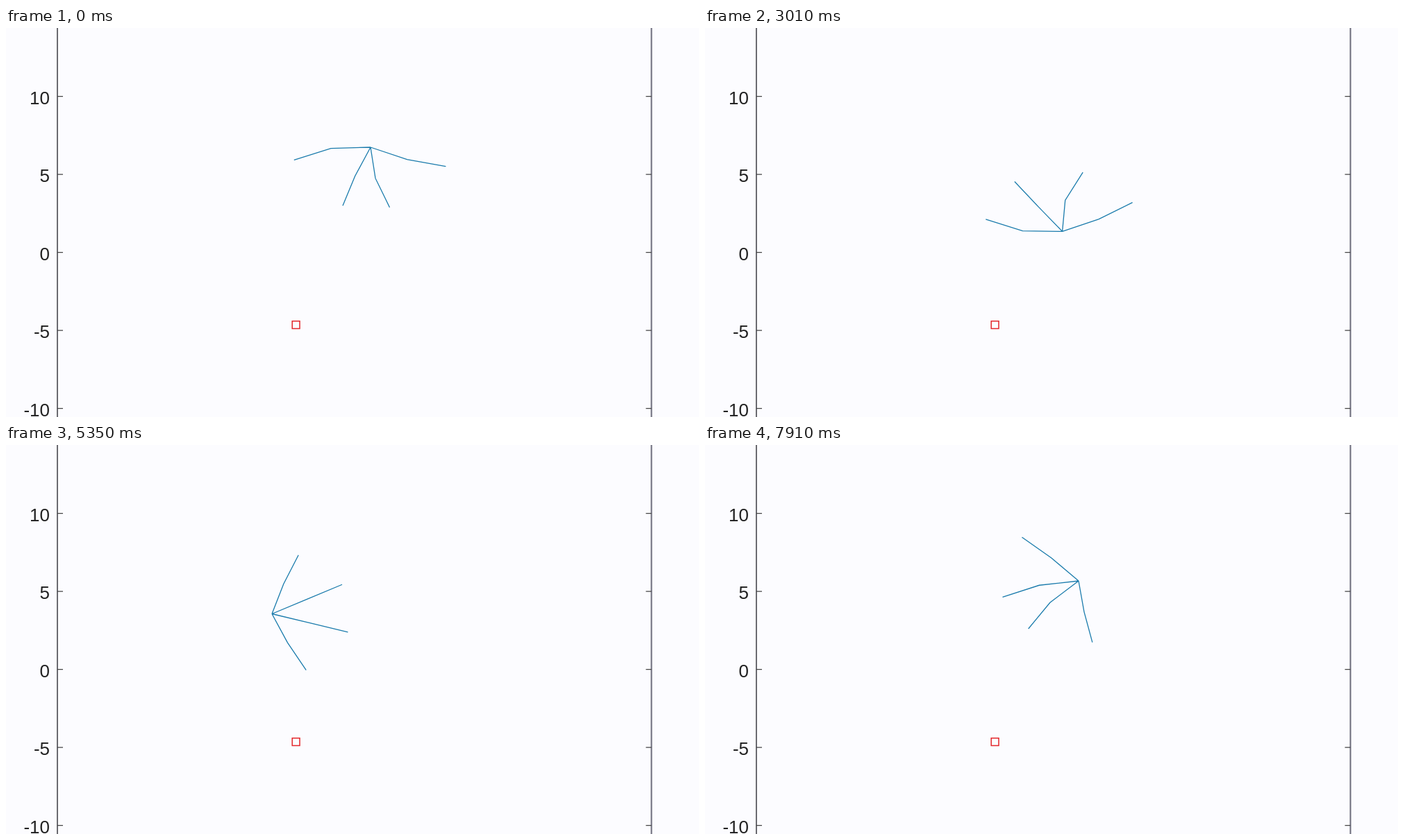
Recreate the animation shown at these times as an HTML page. Size 998x561 px, loop 8000 ms.

```html
<!DOCTYPE html>
<html lang="en">
<head>
<meta charset="utf-8">
<title>Four-legged walker</title>
<style>
  html, body { margin: 0; width: 100%; height: 100%; overflow: hidden; background: #fcfcff; }
  svg { display: block; width: 100%; height: 100%; }
  text { font: 26px "Liberation Sans", Arial, sans-serif; fill: #222; text-anchor: end; }
  path { fill: none; }
  .frame { stroke: #6b6b70; stroke-width: 2; }
  .right { stroke: #6b6b7a; }
  .tick { stroke: #444; stroke-width: 1.3; }
  #legs { stroke: #1a7bac; stroke-width: 1.3; }
</style>
</head>
<body>
<svg viewBox="0 0 998 561">
  <path class="frame" d="M74 0V561"/>
  <path class="frame right" d="M929.5 0V561"/>
  <g id="axis"></g>
  <rect x="412.2" y="422.7" width="10.8" height="10.8" fill="none" stroke="#e3262b" stroke-width="1.5"/>
  <path id="legs"/>
</svg>
<script>
const LOOP = 8000;
const UNIT_X = 28.6, UNIT_Y = 22.5, SEGMENT = 2;

// Fan of the upper segments from the first leg, and bend at each knee, in degrees.
const curled = { fan: [0, 65, 95, 155], bend: [20, 5, 14, 10] };
const hooked = { fan: [0, 70, 115.5, 156], bend: [20, -15, -30, -21] };
const waving = { fan: [0, 60, 100, 156], bend: [5, -25, 10, -21] };
const open = { fan: [0, 50, 95, 140], bend: [5, 0, 0, -5] };
const cupped = { fan: [0, 60, 90, 145], bend: [10, 0, 0, -11] };
const swept = { fan: [0, 55, 91, 145], bend: [5, 14.5, 13, 4] };

const key = (time, x, y, turn, { fan, bend }) =>
  ({ step: stepAt(time), values: [x, y, turn, ...fan, ...bend] });

const keys = [
  key(0, 525, 172, 182, curled),
  key(870, 546, 186, 150, curled),
  key(1430, 589, 218.5, 106, hooked),
  key(2310, 557, 269.5, 44, hooked),
  key(3290, 497, 299, 17, waving),
  key(3710, 474, 291, 10, waving),
  key(5350, 383, 243.5, -67, open),
  key(6470, 439, 173, -139, cupped),
  key(6650, 471, 173, -160, cupped),
  key(7910, 538, 196, -227, swept)
];

// Three updates every 140 ms, held for 20, 20 and 100 ms.
function stepAt(time) {
  const t = time - 30;
  const cycle = Math.floor(t / 140);
  const part = Math.min(2, Math.floor((t - cycle * 140) / 20));
  return Math.max(1, cycle * 3 + part);
}

function slope(i, k) {
  const a = keys[Math.max(0, i - 1)];
  const b = keys[Math.min(keys.length - 1, i + 1)];
  return (b.values[k] - a.values[k]) / (b.step - a.step);
}

// Smooth curve through the keys.
function sample(step) {
  const next = keys.findIndex(({ step: s }) => s > step);
  const i = next < 0 ? keys.length - 2 : next - 1;
  const a = keys[i], b = keys[i + 1];
  const span = b.step - a.step;
  const u = Math.min(1, (step - a.step) / span);
  const v = 1 - u;
  return a.values.map((from, k) =>
    from * v * v * (1 + 2 * u) + b.values[k] * u * u * (3 - 2 * u) +
    span * u * v * (slope(i, k) * v - slope(i + 1, k) * u));
}

function advance([x, y], degrees) {
  const angle = degrees * Math.PI / 180;
  return [
    x + SEGMENT * UNIT_X * Math.cos(angle),
    y - SEGMENT * UNIT_Y * Math.sin(angle)
  ];
}

function legsPath(step) {
  const [x, y, turn, ...angles] = sample(step);
  const hub = [x, y];
  return [0, 1, 2, 3].map(leg => {
    const upper = turn + angles[leg];
    const knee = advance(hub, upper);
    const foot = advance(knee, upper + angles[leg + 4]);
    return `M${hub}L${knee}L${foot}`;
  }).join("");
}

let axis = "";
for (let value = 10; value >= -10; value -= 5) {
  const y = 323.7 - value * UNIT_Y;
  axis += `<path class="tick" d="M74 ${y}h8M929.5 ${y}h-8"/>` +
    `<text x="63" y="${y + 11}">${value}</text>`;
}
document.getElementById("axis").innerHTML = axis;

const legs = document.getElementById("legs");
const start = performance.now();

function draw() {
  const time = (performance.now() - start) % LOOP;
  legs.setAttribute("d", legsPath(stepAt(time)));
  requestAnimationFrame(draw);
}
draw();
</script>
</body>
</html>
```
